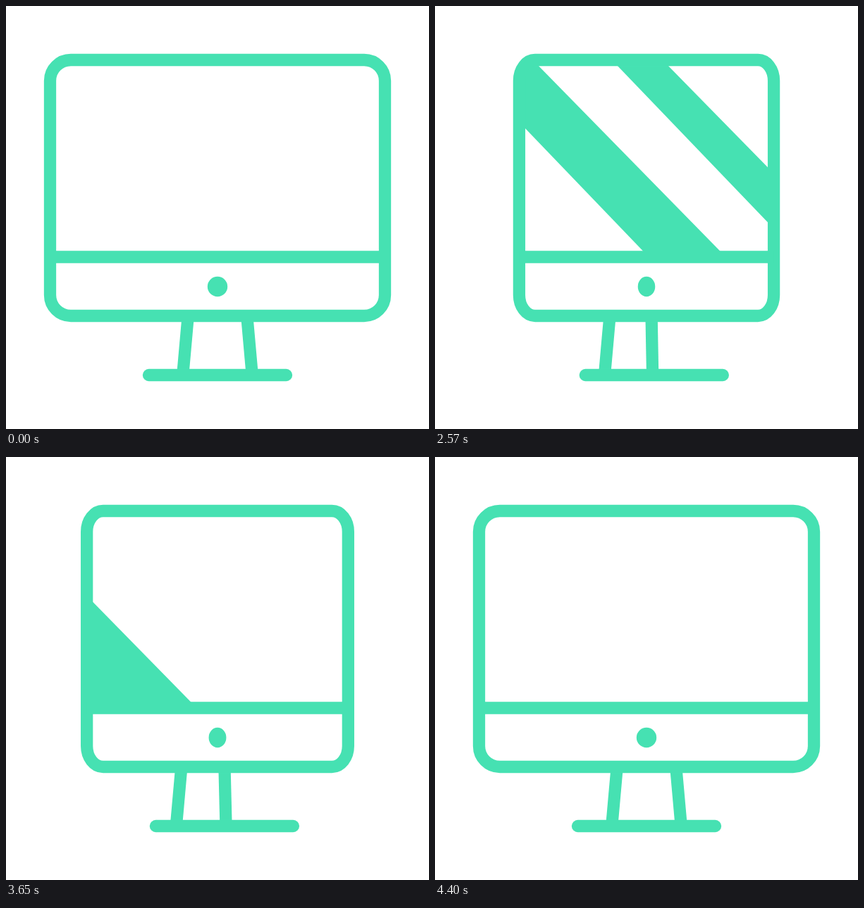
Animation, 600 px wide and 600 px high, one loop 4.43 s. Source, as an HTML page with a canvas:

```html
<!DOCTYPE html>
<html lang="en">
<head>
<meta charset="utf-8">
<title>Turning monitor</title>
<style>
  html, body { margin: 0; width: 100%; height: 100%; overflow: hidden; background: #fff; }
  canvas { display: block; width: 600px; height: 600px; }
</style>
</head>
<body>
<canvas id="stage" width="600" height="600"></canvas>
<script>
const ctx = document.getElementById('stage').getContext('2d');
const LOOP = 4430, STEP = 30;
const GREEN = '#46e1b2';
const MAX_TURN = 67; // how far each side of the monitor moves inward, in px

// Cubic bezier easing with control points (x1, 0) and (x2, 1)
function ease(x, x1, x2) {
  if (x <= 0) return 0;
  if (x >= 1) return 1;
  let lo = 0, hi = 1, s;
  for (let i = 0; i < 24; i++) {
    s = (lo + hi) / 2;
    const r = 1 - s;
    if (3 * s * r * r * x1 + 3 * s * s * r * x2 + s * s * s < x) lo = s; else hi = s;
  }
  return s * s * (3 - 2 * s);
}

function turnAt(t) {
  const turnIn = ease((t - 2000) / 1170, 0.2, 0.07);
  const turnBack = ease((t - 3170) / 1230, 0.64, 0.41);
  return MAX_TURN * (turnIn - turnBack);
}

function line(x1, y1, x2, y2, cap = 'butt') {
  ctx.lineCap = cap;
  ctx.beginPath();
  ctx.moveTo(x1, y1);
  ctx.lineTo(x2, y2);
  ctx.stroke();
}

// Diagonal band; left and right are its edges at the top of the screen
function band(left, right) {
  const top = 70, bottom = 360;
  const lower = y => left + (y - 85) * 0.96;
  const upper = y => right + (y - 85) * 0.98;
  ctx.beginPath();
  ctx.moveTo(lower(top), top);
  ctx.lineTo(upper(top), top);
  ctx.lineTo(upper(bottom), bottom);
  ctx.lineTo(lower(bottom), bottom);
  ctx.fill();
}

function draw(t) {
  const turn = turnAt(t);
  const half = 237.5 - turn;
  const corner = { x: 29.5 * half / 237.5, y: 29.5 };
  const body = new Path2D();
  body.roundRect(300 - half, 76.5, 2 * half, 363, corner);

  ctx.clearRect(0, 0, 600, 600);
  ctx.fillStyle = ctx.strokeStyle = GREEN;
  ctx.lineWidth = 17.3;

  // Stand
  line(258.2 - 0.18 * turn, 440, 250.8 - 0.18 * turn, 523);
  line(341.8 - 0.61 * turn, 440, 349.2 - 0.713 * turn, 523);
  line(202.5 + 0.19 * turn, 523.5, 397.5 + 0.19 * turn, 523.5, 'round');

  // Reflections sweeping over the screen
  ctx.save();
  ctx.clip(body);
  ctx.beginPath();
  ctx.rect(0, 0, 600, 356);
  ctx.clip();
  if (t < 3100) {
    const x = 1.125 * (t - 2570);
    band(x + 43, x + 147);
    band(x + 259, x + 331);
  } else {
    const x = 1.125 * (t - 3890);
    band(x + 65, x + 275);
  }
  ctx.restore();

  // Monitor
  ctx.stroke(body);
  line(300 - half, 356, 300 + half, 356);
  ctx.beginPath();
  ctx.ellipse(300, 398, 14.2 - 0.034 * turn, 14.2, 0, 0, 2 * Math.PI);
  ctx.fill();
}

const start = performance.now();
function tick() {
  const t = (performance.now() - start) % LOOP;
  draw(Math.floor((t - 20) / STEP) * STEP + 20);
  requestAnimationFrame(tick);
}
tick();
</script>
</body>
</html>
```
